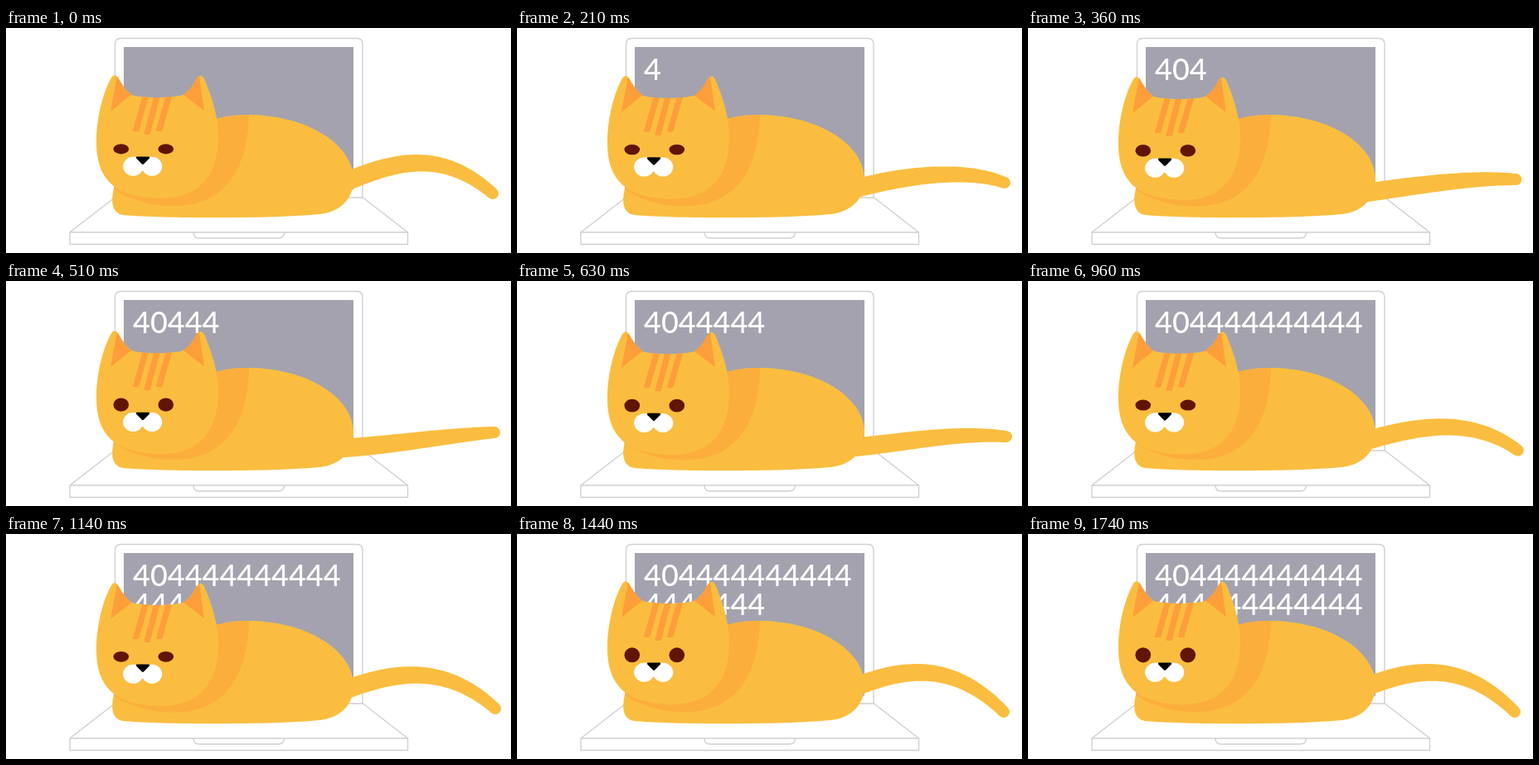
An HTML page with a canvas for the animation above (1800 ms loop, 609x272 px).

```html
<!DOCTYPE html>
<html lang="en">
<head>
<meta charset="utf-8">
<title>Cat on a laptop</title>
<style>
html, body { margin: 0; width: 100%; height: 100%; overflow: hidden; background: #fff; }
canvas { display: block; }
</style>
</head>
<body>
<canvas id="stage" width="609" height="272"></canvas>
<script>
const ctx = document.getElementById('stage').getContext('2d');
const LOOP = 1800, STEP = 30, LAST = 1740;
const FUR = '#fbbd3f', SHADE = '#fcae3c', STRIPE = '#fd9e3a', LINE = '#d0d0d3';

// time, head drop, eye height, then tail: base y, two handles (x, y), tip (x, y)
const POSES = [
  [0,    0,   6.1, 188, 470, 160, 525, 146, 587, 200],
  [210,  0.7, 6.3, 195, 455, 181, 535, 167, 588, 187],
  [510,  3.3, 8.1, 202, 460, 199, 530, 187, 589, 183],
  [780,  5,   7.2, 198, 460, 188, 535, 170, 591, 197],
  [1140, 2,   6.4, 190, 460, 169, 525, 152, 590, 211],
  [1440, 0,   9,   186, 455, 166, 520, 147, 587, 215],
  [1650, 0,   9.1, 186, 455, 166, 520, 147, 587, 215]
];

const BODY = new Path2D('M131 190C127 205 125 223 141 226C200 231 330 230 378 225C405 222 420 205 419 180C415 135 355 105 293 105C275 105 262 107 250 111Z');
const SHADOW = new Path2D('M120 188C150 211 182 216 207 215C265 213 293 170 293 100L240 100Z');
const HEAD = new Path2D('M127 60C117 78 109 108 109 138C109 182 130 205 186 206C232 206 256 180 256 130C256 105 247 80 239 61Q235 54 230 61C225 71 219 78 213 81C200 85 165 85 152 81C146 77 140 69 135 60Q131 54 127 60Z');
const EARS = new Path2D('M134 58L126 101L152 80ZM233 58L213 80L239 100Z');
const NOSE = new Path2D('M158 155.5H172Q174 156 172.5 158L166 164.5Q165 165.3 164 164.5L157.5 158Q156 156 158 155.5Z');

function slope(i, k) {
  const a = POSES[Math.max(i - 1, 0)], b = POSES[Math.min(i + 1, POSES.length - 1)];
  return (b[k] - a[k]) / (b[0] - a[0]);
}

function poseAt(t) {
  const end = POSES.length - 1;
  if (t >= POSES[end][0]) return POSES[end];
  let i = 0;
  while (t >= POSES[i + 1][0]) i++;
  const a = POSES[i], b = POSES[i + 1], d = b[0] - a[0], u = (t - a[0]) / d;
  const flat = i >= end - 2;
  return a.map((v, k) => {
    const m0 = i === end - 1 ? 0 : slope(i, k) * d;
    const m1 = flat ? 0 : slope(i + 1, k) * d;
    const w = u * u * (3 - 2 * u);
    return v + (b[k] - v) * w + m0 * u * (1 - u) * (1 - u) - m1 * u * u * (1 - u);
  });
}

function fill(path, color) {
  ctx.fillStyle = color;
  ctx.fill(path);
}

function ellipse(x, y, rx, ry, color) {
  ctx.fillStyle = color;
  ctx.beginPath();
  ctx.ellipse(x, y, rx, ry, 0, 0, Math.PI * 2);
  ctx.fill();
}

function laptop() {
  ctx.strokeStyle = LINE;
  ctx.lineWidth = 1.4;
  ctx.lineJoin = 'round';
  ctx.stroke(new Path2D('M131.5 205V19.5Q131.5 12.5 138.5 12.5H423Q430 12.5 430 19.5V205'));
  ctx.stroke(new Path2D('M131 205H430.5L484.5 247V261.5H77V247ZM77 247H484.5M226 247Q226 254 233 254H328Q335.5 254 335.5 247'));
  ctx.fillStyle = '#a3a2ae';
  ctx.fillRect(142, 23, 277, 172.5);
}

function typing(t) {
  const n = Math.max(0, Math.min(24, Math.floor(5.6 + (t - 510) / 66)));
  const text = ('40' + '4'.repeat(22)).slice(0, n);
  ctx.font = '500 36px Lato, sans-serif';
  ctx.fillStyle = '#fff';
  ctx.fillText(text.slice(0, 12), 153, 63.3);
  ctx.fillText(text.slice(12), 153, 98);
}

function tail(p) {
  const [y0, x1, y1, x2, y2, x3, y3] = p.slice(3);
  const bez = (a, b, c, d, u) => {
    const v = 1 - u;
    return v * v * v * a + 3 * v * v * u * b + 3 * v * u * u * c + u * u * u * d;
  };
  const rate = (a, b, c, d, u) => {
    const v = 1 - u;
    return v * v * (b - a) + 2 * v * u * (c - b) + u * u * (d - c);
  };
  const upper = [], lower = [];
  for (let i = 0; i <= 40; i++) {
    const u = i / 40, r = 11.3 - 4.3 * u * u;
    const x = bez(405, x1, x2, x3, u), y = bez(y0, y1, y2, y3, u);
    const dx = rate(405, x1, x2, x3, u), dy = rate(y0, y1, y2, y3, u);
    const k = r / Math.hypot(dx, dy);
    upper.push([x + dy * k, y - dx * k]);
    lower.unshift([x - dy * k, y + dx * k]);
  }
  ctx.fillStyle = FUR;
  ctx.beginPath();
  upper.concat(lower).forEach(q => ctx.lineTo(q[0], q[1]));
  ctx.fill();
  ellipse(x3, y3, 7, 7, FUR);
}

function body(drop) {
  fill(BODY, FUR);
  ctx.save();
  ctx.clip(BODY);
  ctx.translate(0, drop * 0.3);
  fill(SHADOW, SHADE);
  ctx.restore();
}

function head(drop, eye) {
  ctx.save();
  ctx.translate(0, drop);
  fill(HEAD, FUR);
  ctx.save();
  ctx.clip(HEAD);
  fill(EARS, STRIPE);
  for (const [x, y] of [[169, 121], [182.5, 125], [197, 121]]) {
    const foot = x - 12.5;
    ctx.fillStyle = ctx.strokeStyle = STRIPE;
    ctx.lineWidth = 3;
    ctx.lineJoin = 'round';
    ctx.beginPath();
    ctx.moveTo(x - 2, 80);
    ctx.lineTo(x + 2.5, 80);
    ctx.lineTo(foot + 2.5, y + 2.5);
    ctx.lineTo(foot - 2, y + 2.5);
    ctx.closePath();
    ctx.fill();
    ctx.stroke();
  }
  ctx.restore();
  ellipse(138.8, 146.3, 9.3, eye, '#611500');
  ellipse(192.8, 146.3, 9.3, eye, '#611500');
  ellipse(153.3, 167.3, 12.2, 11.5, '#fff');
  ellipse(176, 167.3, 12.2, 11.5, '#fff');
  ctx.fillRect(153, 155.8, 23, 17);
  fill(NOSE, '#000');
  ctx.restore();
}

function draw(now) {
  const t = Math.min(LAST, Math.floor((now % LOOP) / STEP) * STEP);
  const p = poseAt(t);
  ctx.fillStyle = '#fff';
  ctx.fillRect(0, 0, 609, 272);
  laptop();
  typing(t);
  tail(p);
  body(p[1]);
  head(p[1], p[2]);
}

const start = performance.now();
function tick() {
  draw(performance.now() - start);
  requestAnimationFrame(tick);
}
tick();
</script>
</body>
</html>
```
